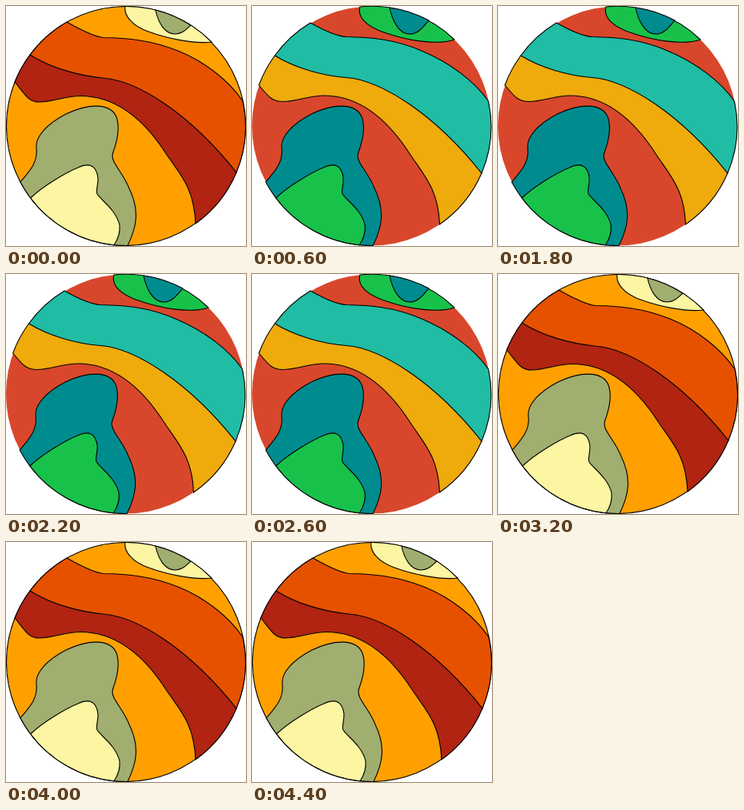
An HTML page for the animation above (4.6 s loop, 300 by 300 pixels).

```html
<!DOCTYPE html>
<html lang="en">
<head>
<meta charset="utf-8">
<title>Planet</title>
<style>
  html, body { margin: 0; width: 100%; height: 100%; overflow: hidden; background: #fff; }
  svg { display: block; width: 100vw; height: 100vh; }
  path, .rim { stroke: #000; stroke-width: 1.1; }
  #warm { --base: #ffa000; --wide: #e65100; --narrow: #b02411; --land: #a0ae6f; --core: #fcf5a2; }
  #cool { --base: #d8472b; --wide: #20bca4; --narrow: #efaa0c; --land: #008c8f; --core: #18c24a; }
</style>
</head>
<body>
<svg viewBox="0 0 300 300">
  <defs>
    <g id="continent">
      <path fill="var(--land)" d="M18 220C30 206 40 195 38 178C36 163 52 147 75 135C100 123 131 119 138.5 140
        C143 155 138 172 133.5 184C130 195 146 207 154 228C167 255 164 275 152 299.5
        A149.5 149.5 0 0 1 18 220Z"/>
      <path fill="var(--core)" d="M30.7 240C45 226 75 208 90 202C105 195 113 200 115 215C115 226 112 231 114 235
        C118 242 138 255 142 274C143 285 139 293 135 298.8A149.5 149.5 0 0 1 30.7 240Z"/>
    </g>
  </defs>
  <!-- The narrow band tucks under the wide one, so their shared edge is drawn once. -->
  <g id="warm">
    <circle class="rim" cx="150" cy="150" r="149.5" fill="var(--base)"/>
    <path fill="var(--narrow)" d="M30 61C80 60 200 80 288 208A149.5 149.5 0 0 1 237 272
      C235 228 219 212 201 186C178 150 143 112.5 93 112.5C74 112.5 58 120 42 120
      C28 120 25 112 11 95A149.5 149.5 0 0 1 30 61Z"/>
    <path fill="var(--wide)" d="M76 20C92 29 110 38.5 122 39.5C150 40 180 42 215 56C250 70 280 95 296 119
      A149.5 149.5 0 0 1 288 208C230 135 165 93 121 90C90 87 55 77 30 61A149.5 149.5 0 0 1 76 20Z"/>
    <use href="#continent"/>
    <path fill="var(--core)" d="M149 .5C147 12 158 25 178 32C200 40 235 48 257 45A149.5 149.5 0 0 0 149 .5Z"/>
    <path fill="var(--land)" d="M187 5C190 20 198 35 211 35C221 35 225 29 231 24A149.5 149.5 0 0 0 187 5Z"/>
  </g>
  <g id="cool">
    <circle cx="149.5" cy="150" r="149.5" fill="var(--base)"/>
    <path fill="var(--narrow)" d="M28.5 62C78 60 198 80 287 209A149.5 149.5 0 0 1 234.5 273
      C233 230 216 213 198 186C175 150 140 112 90 112C71 112 55 119.5 39 119.5
      C24 119.5 20 112 8.6 99A149.5 149.5 0 0 1 28.5 62Z"/>
    <path fill="var(--wide)" d="M73 21C89 30 106 38 118 38.5C146 39 177 41 212 56C248 71 279 95 295.5 119
      A149.5 149.5 0 0 1 287 209C228 135 162 93 118 89.5C87 87 53 77 28.5 62A149.5 149.5 0 0 1 73 21Z"/>
    <use href="#continent" x="-.8"/>
    <path fill="var(--core)" d="M135 1C131 15 145 26 165 33C190 42 230 50 253 42A149.5 149.5 0 0 0 135 1Z"/>
    <path fill="var(--land)" d="M172 2C175 17 183 35 197 35C208 35 214 26 221 18A149.5 149.5 0 0 0 172 2Z"/>
  </g>
</svg>
<script>
  const LOOP = 4600, STEP = 200;
  const warm = document.getElementById('warm');
  const cool = document.getElementById('cool');

  function draw(now) {
    const isCool = Math.floor((now % LOOP) / STEP) % 2 === 1;
    warm.style.display = isCool ? 'none' : '';
    cool.style.display = isCool ? '' : 'none';
  }

  function tick() {
    draw(performance.now());
    requestAnimationFrame(tick);
  }
  tick();
</script>
</body>
</html>
```
